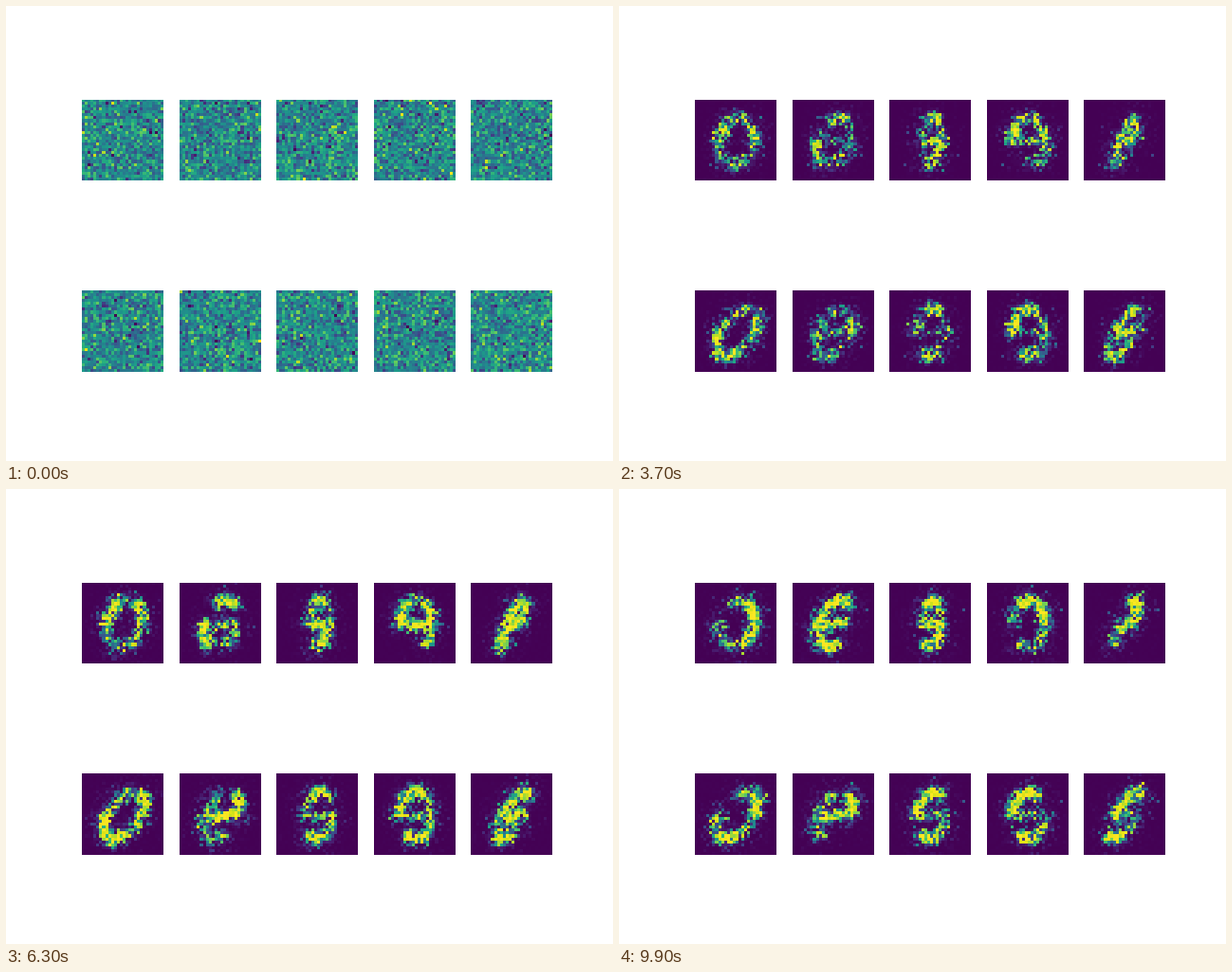
Animation of 640 by 480 pixels, one loop 10000 ms. Source, as a matplotlib script:

```python
import numpy as np
import matplotlib.pyplot as plt
from matplotlib.animation import FuncAnimation

FRAMES, SIZE = 100, 28
START = "acdefg"

# Each panel: half width, slant, then the lit segments early, midway and late.
# Segments are lettered as on a digital clock; capitals are bright.
PANELS = [
    (6.0, 1.0, "abcdef", "aBcdeF", "aBCde"),
    (5.5, 2.0, "abcdef", "AcEg", "AFGED"),
    (3.0, 0.5, "abcdefg", "AbfGCd", "AfbGCD"),
    (5.5, 0.0, "aFbcd", "aFBGc", "AfBcd"),
    (2.0, 3.5, "abcefg", "aBFGEd", "ABGe"),
    (6.0, 3.5, "abcdef", "aBcDEf", "aBcDe"),
    (5.5, 2.5, "abcdef", "fBGed", "fBGe"),
    (5.0, 1.0, "abdf", "AfgcD", "AFgcD"),
    (5.5, 0.0, "aFbcd", "AFbgcD", "AFgcD"),
    (3.5, 4.0, "abcdefg", "AFGcDe", "AFgcD"),
]
yy, xx = np.mgrid[:SIZE, :SIZE]


def segment(name, width, slant):
    """Points of one segment: a sixth of an ellipse, or the middle bar."""
    if name == "g":
        u = np.linspace(-0.55, 0.55, 9)
        v = -0.08 * slant * u
    else:
        a = np.radians(60 * "abcdef".index(name) - 90 + np.linspace(-27, 27, 9))
        u, v = np.cos(a), np.sin(a)
    return 14 + width * u - slant * v, 14 + 8 * v


def field(word, width, slant, spread):
    """Brightness logit and noise envelope of a lit digit."""
    core = halo = reach = np.zeros((SIZE, SIZE))
    for ch in word:
        px, py = segment(ch.lower(), width, slant)
        d2 = ((xx[..., None] - px) ** 2 + (yy[..., None] - py) ** 2).min(axis=-1)
        level = 0.95 if ch.isupper() else 0.64
        core = np.maximum(core, level * np.exp(-d2 / spread))
        halo = np.maximum(halo, level * np.exp(-d2 / 25))
        reach = np.maximum(reach, np.exp(-d2 / 45))
    return 7 * core + 1.5 * halo - 5, reach + 0.1


def poses(width, slant, *words):
    return [field(START, 5.5, 1.5, 9)] + [field(w, width, slant, 5.5) for w in words]


fields = np.array([poses(*p) for p in PANELS])
rng = np.random.default_rng(11)


def drift(*shape):
    """Noise that partly persists from one frame to the next."""
    n = rng.normal(size=(FRAMES,) + shape)
    for t in range(1, FRAMES):
        n[t] = 0.6 * n[t - 1] + 0.8 * n[t]
    return n


common = drift(SIZE, SIZE)
own = drift(len(PANELS), SIZE, SIZE)


def images(t):
    if t == 0:
        return np.clip(0.47 + 0.155 * own[0], 0, 1)
    phase = np.interp(t, [12, 27, 45, 65, 88], [0, 1, 2, 2, 3])
    i = min(int(phase), 2)
    logit, reach = np.moveaxis(
        fields[:, i] + (phase - i) * (fields[:, i + 1] - fields[:, i]), 1, 0)
    share = np.interp(t, [12, 45], [0.96, 0.75])
    noise = share * common[t] + np.sqrt(1 - share ** 2) * own[t]
    dim = np.interp(t, [12, 27, 45], [0.3, 0.8, 0])
    out = 1 / (1 + np.exp(-1.1 * (logit - dim + 1.8 * reach * noise)))

    # Stray hot cells, shared by all panels
    r = np.random.default_rng(t)
    gain = r.uniform(0.6, 1.1, len(PANELS))
    for _ in range(r.integers(1, 5) if t > 35 else 0):
        x, y = r.integers(2, 27, 2)
        out[:, y, x] = np.maximum(out[:, y, x], r.uniform(0.1, 0.8) * gain)
    return out


fig, axes = plt.subplots(2, 5, figsize=(6.4, 4.8), dpi=100)
views = []
for ax, img in zip(axes.flat, images(0)):
    ax.axis("off")
    views.append(ax.imshow(img, cmap="viridis", vmin=0, vmax=1))


def update(t):
    for view, img in zip(views, images(t)):
        view.set_data(img)
    return views


anim = FuncAnimation(fig, update, frames=FRAMES, interval=100, repeat=True,
                     repeat_delay=0, blit=False)
plt.show()
```
